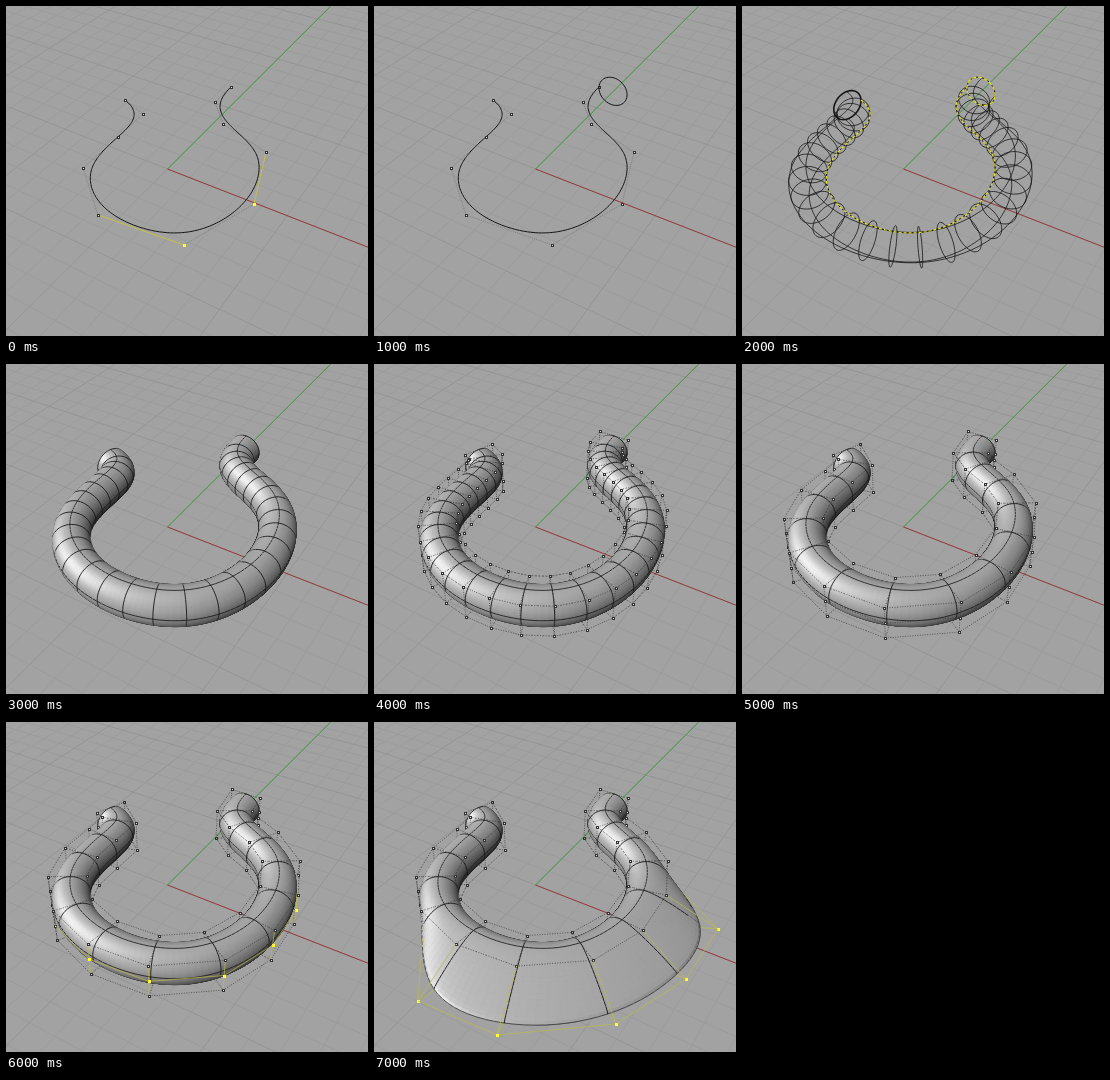
These frames come from a looping animation (362x330 px, 8000 ms). An HTML page with a canvas:

```html
<!DOCTYPE html>
<html lang="en">
<head>
<meta charset="utf-8">
<title>Sweep along a curve</title>
<style>
html, body { margin: 0; width: 100%; height: 100%; overflow: hidden; background: #a2a2a2; }
canvas { display: block; }
</style>
</head>
<body>
<canvas id="stage" width="362" height="330"></canvas>
<script>
const W = 362, H = 330, STEP = 1000;
const CX = 161.5, CY = 163, FOCAL = 687;
const SIN = 0.624, COS = 0.781;
const RADIUS = 18.3, BLACK = '#151515', YELLOW = '#e8e820';
let ctx;

// World: x right, y forward on the ground, z up.
function project([x, y, z = 0]) {
  const depth = FOCAL + y * COS - z * SIN;
  return [CX + FOCAL * x / depth, CY - FOCAL * (y * SIN + z * COS) / depth, depth];
}

function toGround([sx, sy]) {
  const v = (CY - sy) / FOCAL;
  const y = v * FOCAL / (SIN - v * COS);
  return [(sx - CX) * (FOCAL + y * COS) / FOCAL, y];
}

const handles = [[119, 94], [137, 108], [112, 131], [77, 162], [92, 209], [178, 239],
  [248, 198], [260, 146], [217, 118], [209, 96], [225, 81]];
const rail = handles.map(toGround);

// Clamped uniform cubic B-spline, t in 0..1.
function railPoint(t) {
  const spans = rail.length - 3, x = t * spans;
  const k = Math.min(Math.floor(x), spans - 1) + 3;
  const knot = i => Math.max(0, Math.min(spans, i - 3));
  const d = rail.slice(k - 3, k + 1);
  for (let r = 1; r <= 3; r++) {
    for (let j = 3; j >= r; j--) {
      const lo = knot(j + k - 3), a = (x - lo) / (knot(j + 1 + k - r) - lo);
      d[j] = [0, 1].map(c => d[j - 1][c] * (1 - a) + d[j][c] * a);
    }
  }
  return d[3];
}

// Cross-section frame: rail point and outward normal.
function frameAt(t) {
  const a = railPoint(Math.max(0, t - 0.001)), b = railPoint(Math.min(1, t + 0.001));
  const dx = b[0] - a[0], dy = b[1] - a[1], len = Math.hypot(dx, dy);
  return { p: railPoint(t), n: [dy / len, -dx / len] };
}

// Section point from offsets in radii: out along the normal, up along z.
function offset({ p, n }, out, up) {
  const d = RADIUS * (1 + out);
  return [p[0] + n[0] * d, p[1] + n[1] * d, RADIUS * up];
}

function line(points, color, width = 1, dash = []) {
  ctx.beginPath();
  points.forEach(p => ctx.lineTo(p[0], p[1]));
  ctx.strokeStyle = color;
  ctx.lineWidth = width;
  ctx.setLineDash(dash);
  ctx.stroke();
  ctx.setLineDash([]);
}

function knob([x, y], selected) {
  const left = Math.round(x) - 1, top = Math.round(y) - 1;
  ctx.fillStyle = selected ? '#ffff30' : '#333';
  ctx.fillRect(left, top, 3, 3);
  if (!selected) {
    ctx.fillStyle = '#e0e0e0';
    ctx.fillRect(left + 1, top + 1, 1, 1);
  }
}

function drawGround() {
  ctx.fillStyle = '#a2a2a2';
  ctx.fillRect(0, 0, W, H);
  const cell = 26, count = 20, reach = cell * count;
  const at = (a, b) => project([a * 0.848 + b * 0.53, -a * 0.53 + b * 0.848]);
  for (let i = -count; i <= count; i++) {
    const color = i % 5 ? '#9a9a9a' : '#919191';
    line([at(i * cell, -reach), at(i * cell, reach)], color, 0.8);
    line([at(-reach, i * cell), at(reach, i * cell)], color, 0.8);
  }
  line([at(0, 0), at(0, reach)], '#3f9a3f');
  line([at(0, 0), at(reach, 0)], '#94393c');
}

const range = (n, f) => Array.from({ length: n + 1 }, (_, i) => f(i));
const railLine = range(240, i => project(railPoint(i / 240)));

function circle(t) {
  const frame = frameAt(t);
  return range(48, i => {
    const a = i / 24 * Math.PI;
    return project(offset(frame, Math.cos(a), Math.sin(a)));
  });
}

function drawCurve(selected) {
  for (let i = 1; i < handles.length; i++) {
    const lit = selected && (i === 5 || i === 7);
    line([handles[i - 1], handles[i]], lit ? '#c9c92c' : '#777', 0.8, lit ? [] : [1, 1]);
  }
  line(railLine, BLACK);
  handles.forEach((p, i) => knob(p, selected && (i === 5 || i === 6)));
  if (!selected) line(circle(1), BLACK);
}

const FINE = 32, COARSE = 15;

function drawWire() {
  for (let i = 0; i < FINE; i++) line(circle(i / FINE), BLACK, i ? 0.8 : 1.6);
  for (const [out, up] of [[1, 0], [0, 1], [0, -1]]) {
    line(range(240, i => project(offset(frameAt(i / 240), out, up))), BLACK, 0.8);
  }
  line(railLine, BLACK);
  line(railLine, YELLOW, 1.2, [3, 2]);
  line(circle(1), BLACK);
  line(circle(1), YELLOW, 1.2, [4, 2]);
}

// Control cage: four corners and the outer middle of each section.
const cageOffsets = [[-1, 1], [1, 1], [1, 0], [1, -1], [-1, -1]];

function makeCage(count) {
  const raw = range(count, k => {
    const frame = frameAt(k / count);
    return cageOffsets.map(([o, u]) => offset(frame, o, u));
  });
  return raw.map((column, k) => k === 0 || k === count ? column : column.map((p, j) =>
    p.map((v, c) => v - (raw[k - 1][j][c] - 2 * v + raw[k + 1][j][c]) / 6)));
}

const flareTargets = [[44, 279], [123, 313], [242, 302], [312, 257], [344, 207]];
const FIRST = 6;

function pullOut(cage) {
  return flareTargets.map((target, i) => {
    const p = cage[FIRST + i][2], q = toGround(target), shift = [q[0] - p[0], q[1] - p[1]];
    cage[FIRST + i][2] = [q[0], q[1], 0];
    return shift;
  });
}

function cubicBump(x) {
  x = Math.abs(x);
  if (x >= 2) return 0;
  return x >= 1 ? (2 - x) ** 3 / 6 : 2 / 3 - x * x + x ** 3 / 2;
}

// Weights of a rational quadratic quarter arc.
function arcWeights(u) {
  const raw = [(1 - u) ** 2, Math.SQRT2 * u * (1 - u), u * u];
  const sum = raw[0] + raw[1] + raw[2];
  return raw.map(v => v / sum);
}

function arcPoint(v, perArc) {
  const quad = Math.floor(v / perArc) % 4, u = (v % perArc) / perArc;
  const [a, b, c] = arcWeights(u), x = a + b, y = b + c;
  const pos = [[x, y], [-y, x], [-x, -y], [y, -x]][quad];
  if (quad === 1 || quad === 2) return { pos, pull: 0 };
  // A slightly rounded rim.
  const fromRim = Math.min(1, Math.hypot(quad ? 1 - u : u, 0.06));
  return { pos, pull: arcWeights(fromRim)[0] };
}

function shade(a, b, c, d) {
  const cam = ([x, y, z]) => [x, y * SIN + z * COS, z * SIN - y * COS];
  const [p, q, r, s] = [a, b, c, d].map(cam);
  const e = p.map((v, i) => r[i] - v), f = q.map((v, i) => s[i] - v);
  let n = [e[1] * f[2] - e[2] * f[1], e[2] * f[0] - e[0] * f[2], e[0] * f[1] - e[1] * f[0]];
  const len = Math.hypot(...n) || 1, sign = n[2] < 0 ? -1 : 1;
  n = n.map(v => v * sign / len);
  const light = -0.55 * n[0] + 0.36 * n[1] + 0.75 * n[2];
  return Math.round(Math.min(250, 92 + 96 * light + 58 * Math.max(0, light) ** 16));
}

function drawTube({ count, cage: showCage, selected, flared }) {
  const cage = makeCage(count);
  const shifts = flared ? pullOut(cage) : [];
  const sub = count === FINE ? 5 : 10, cols = count * sub, perArc = 18, rows = perArc * 4;

  const grid = range(cols, i => {
    const frame = frameAt(i / cols);
    const move = [0, 1].map(c => shifts.reduce((sum, s, k) =>
      sum + s[c] * cubicBump(i / sub - FIRST - k), 0));
    return range(rows, j => {
      const { pos, pull } = arcPoint(j, perArc);
      const p = offset(frame, ...pos);
      return [p[0] + move[0] * pull, p[1] + move[1] * pull, p[2]];
    });
  });
  const flat = grid.map(column => column.map(project));

  const items = [];
  const add = (points, bias, draw) => items.push({
    depth: points.reduce((sum, p) => sum + p[2], 0) / points.length - bias, draw
  });
  const addLine = (a, b, bias, ...style) => add([a, b], bias, () => line([a, b], ...style));
  const facing = (i, j) => {
    const a = flat[i][j], b = flat[i + 1][j], c = flat[i + 1][j + 1], d = flat[i][j + 1];
    return (c[0] - a[0]) * (d[1] - b[1]) - (c[1] - a[1]) * (d[0] - b[0]) > 0;
  };

  for (let i = 0; i <= cols; i++) {
    for (let j = 0; j < rows; j++) {
      const a = flat[i][j], d = flat[i][j + 1];
      if (i % sub === 0) addLine(a, d, 2.5, BLACK, 0.9);
      if (i === cols) continue;
      const b = flat[i + 1][j], c = flat[i + 1][j + 1];
      const g = shade(grid[i][j], grid[i + 1][j], grid[i + 1][j + 1], grid[i][j + 1]);
      const color = `rgb(${g},${g},${g})`;
      add([a, b, c, d], 0, () => {
        line([a, b, c, d, a], color, 0.8);
        ctx.fillStyle = color;
        ctx.fill();
      });
      const outline = facing(i, j) !== facing(i, (j + rows - 1) % rows);
      if (outline || j % perArc === 0) addLine(a, b, 2.5, outline ? '#333' : BLACK, 0.8);
    }
  }

  if (showCage) {
    const used = count === FINE ? [0, 1, 3, 4] : [0, 1, 2, 3, 4];
    const lit = (k, j) => selected && j === 2 && k >= FIRST && k < FIRST + flareTargets.length;
    const pts = cage.map(column => column.map(project));
    const link = (k, j, m, l) => {
      const on = lit(k, j) || lit(m, l);
      // Short pieces sort correctly against the surface.
      const mix = f => pts[k][j].map((v, c) => v + (pts[m][l][c] - v) * f);
      for (let s = 0; s < 6; s++) {
        addLine(mix(s / 6), mix((s + 1) / 6), 4, on ? '#bcbc4a' : '#333', 0.7, on ? [] : [1, 1.5]);
      }
    };
    pts.forEach((column, k) => used.forEach((j, n) => {
      link(k, j, k, used[(n + 1) % used.length]);
      if (k < count) link(k, j, k + 1, j);
      add([column[j]], 6, () => knob(column[j], lit(k, j)));
    }));
  }

  items.sort((a, b) => b.depth - a.depth).forEach(item => item.draw());
}

const scenes = [
  () => drawCurve(true),
  () => drawCurve(false),
  drawWire,
  () => drawTube({ count: FINE }),
  () => drawTube({ count: FINE, cage: true }),
  () => drawTube({ count: COARSE, cage: true }),
  () => drawTube({ count: COARSE, cage: true, selected: true }),
  () => drawTube({ count: COARSE, cage: true, selected: true, flared: true })
].map(draw => {
  const layer = document.createElement('canvas');
  layer.width = W;
  layer.height = H;
  ctx = layer.getContext('2d');
  ctx.lineJoin = 'round';
  drawGround();
  draw();
  return layer;
});

const screen2d = document.getElementById('stage').getContext('2d');
const start = performance.now();

function tick() {
  const time = performance.now() - start;
  screen2d.drawImage(scenes[Math.floor(time / STEP) % scenes.length], 0, 0);
  requestAnimationFrame(tick);
}
tick();
</script>
</body>
</html>
```
